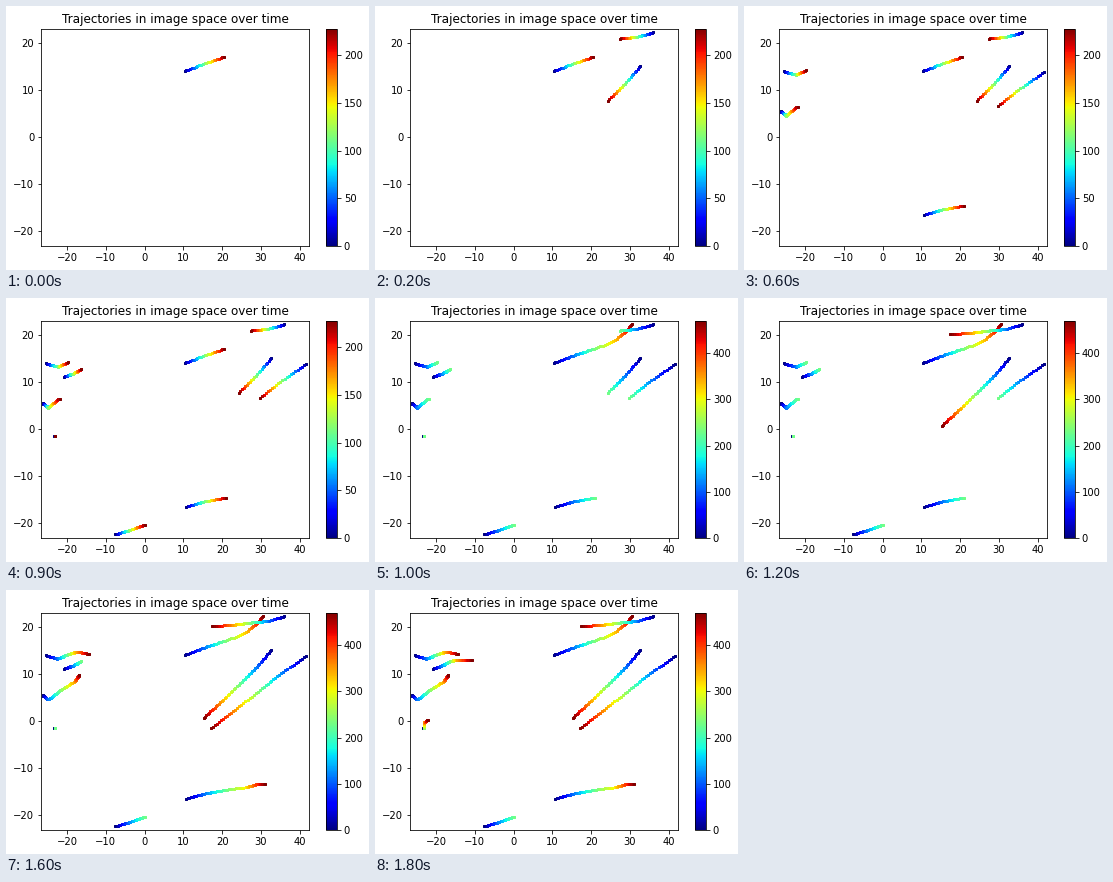
Write a matplotlib script that moves like this. It is 363 px wide and 264 px high and loops after 1900 ms.

```python
import numpy as np
import matplotlib.pyplot as plt
from matplotlib.animation import FuncAnimation
from matplotlib.cm import ScalarMappable
from matplotlib.colors import Normalize

W, H, DPI = 363, 264, 72
HALF, FULL = 228, 470      # time span of the first and the extended pass
STEP = 10

# Way points of each path: first pass, then its continuation.
PATHS = [
    ([(10.3, 14.0), (15.5, 15.6), (20.5, 17.0)],
     [(24, 18.0), (27, 19.4), (29, 20.8), (30.5, 22.3)]),
    ([(36.0, 22.2), (31.5, 21.2), (27.4, 20.9)],
     [(22.5, 20.4), (17.5, 20.1)]),
    ([(32.7, 15.1), (28.7, 11.3), (24.3, 7.7)],
     [(19.5, 3.9), (15.2, 0.6)]),
    ([(41.7, 13.8), (35.5, 10.3), (29.8, 6.6)],
     [(23.4, 2.4), (17.2, -1.6)]),
    ([(10.7, -16.6), (15.5, -15.5), (21.0, -14.7)],
     [(26, -14.2), (28.5, -13.6), (31.0, -13.4)]),
    ([(-25.5, 13.9), (-22.4, 13.2), (-19.8, 14.1)],
     [(-17.5, 14.7), (-14.3, 14.2)]),
    ([(-26.2, 5.4), (-24.9, 4.5), (-21.9, 6.4)],
     [(-18.0, 8.4), (-16.8, 9.8)]),
    ([(-20.7, 11.1), (-18.5, 11.7), (-16.3, 12.7)],
     [(-14.5, 13.0), (-10.7, 12.9)]),
    ([(-23.2, -1.6), (-23.1, -1.6)],
     [(-23.1, -0.4), (-22.1, 0.2)]),
    ([(-7.5, -22.5), (-4.0, -21.6), (0.0, -20.5)], []),
]
COUNT = len(PATHS)
FRAMES = 2 * COUNT - 1


def sample(first, rest, extended):
    """Evenly timed points along a path, with their times."""
    knots = np.linspace(0, HALF, len(first))
    pts, end = list(first), HALF
    if extended:
        knots = np.append(knots, np.linspace(HALF, FULL, len(rest) + 1)[1:])
        pts, end = pts + rest, FULL
    t = np.linspace(0, end, end // STEP + 1)
    x, y = np.array(pts).T
    return np.interp(t, knots, x), np.interp(t, knots, y), t


def add_axes(x, y, w, h):
    return fig.add_axes([x / W, y / H, w / W, h / H])


plt.rcParams.update({"font.family": "DejaVu Sans", "font.size": 10})
fig = plt.figure(figsize=(W / DPI, H / DPI), dpi=DPI, facecolor="white")

ax = add_axes(35.3, 23.9, 267.84, 217.44)
ax.set(xlim=(-26.6, 42.4), ylim=(-23.3, 23.0),
       xticks=range(-20, 41, 10), yticks=range(-20, 21, 10))
ax.set_title("Trajectories in image space over time", fontsize=12)

norm = Normalize(0, HALF)
cax = add_axes(319.9, 23.9, 10.87, 217.44)
bar = fig.colorbar(ScalarMappable(norm, "jet"), cax=cax)

dots = [ax.scatter([], [], c=[], s=4, marker="s", cmap="jet", norm=norm,
                   linewidths=1, edgecolors="face") for _ in PATHS]


def draw(i):
    second = i >= COUNT
    top, gap = (FULL, 100) if second else (HALF, 50)
    norm.vmax = top
    bar.set_ticks(range(0, top, gap))
    for k, (dot, (first, rest)) in enumerate(zip(dots, PATHS)):
        dot.set_visible(k <= i)
        x, y, t = sample(first, rest, k <= i - COUNT)
        dot.set_offsets(np.column_stack([x, y]))
        dot.set_array(t)
    return dots


anim = FuncAnimation(fig, draw, frames=FRAMES, interval=100,
                     init_func=lambda: dots, repeat=True, repeat_delay=0)
plt.show()
```
